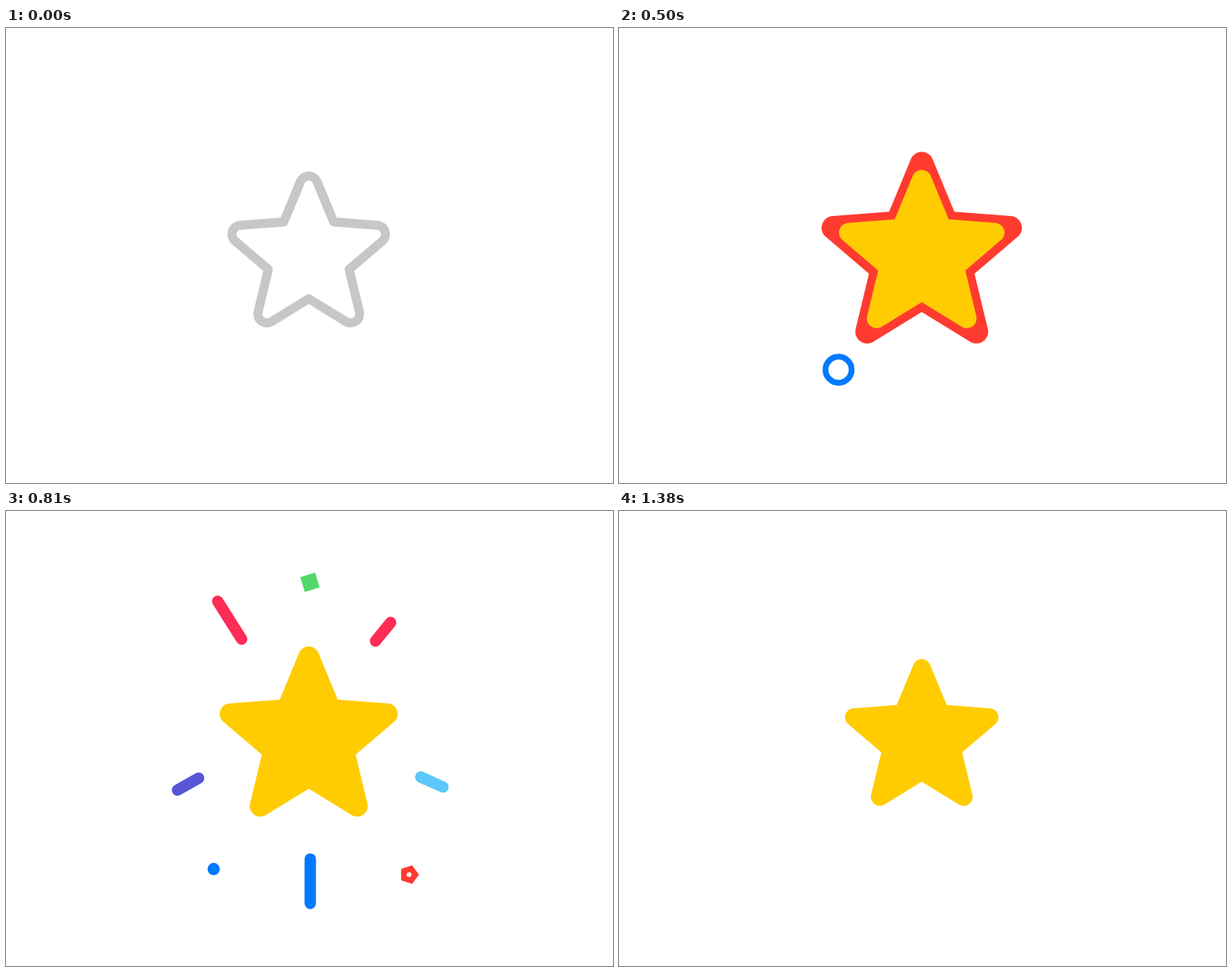
An HTML page with a canvas for the animation above (1410 ms loop, 800 by 600 pixels).

```html
<!DOCTYPE html>
<html lang="en">
<head>
<meta charset="utf-8">
<title>Star burst</title>
<style>
  html, body { margin: 0; width: 100%; height: 100%; overflow: hidden; background: #fff; }
  canvas { display: block; }
</style>
</head>
<body>
<canvas id="stage" width="800" height="600"></canvas>
<script>
const ctx = document.getElementById('stage').getContext('2d');
const LOOP = 1410;
const CX = 399, CY = 299.7;
const PEAK = 1.467, DIP = 0.931;

// Short pauses: the picture holds from the first time to the second.
const HOLDS = [[500, 570], [810, 880], [1030, 1100], [1220, LOOP]];

// Rays: colour, inner end, outer end.
const RAYS = [
  ['#ff2d55', 316, 177.6, 279, 119],
  ['#ff2d55', 483.5, 175.7, 507, 147],
  ['#5856d6', 258.7, 349.6, 226, 368],
  ['#5ac8fa', 541.7, 348.6, 576, 364],
  ['#007aff', 401, 448.8, 401, 517.5]
];

const progress = (t, a, b) => Math.min(1, Math.max(0, (t - a) / (b - a)));
const outCubic = x => 1 - (1 - x) ** 3;
const smooth = x => x * x * (3 - 2 * x);
const mix = (a, b, x) => a + (b - a) * x;
const rad = deg => deg * Math.PI / 180;

function starPath(scale) {
  const point = i => {
    const r = i % 2 ? 56 : 125;
    const a = rad(i * 36);
    return [CX + scale * r * Math.sin(a), CY + scale * (1.3 - r * Math.cos(a))];
  };
  ctx.beginPath();
  ctx.moveTo(...point(-1));
  for (let i = 0; i < 10; i += 2) {
    ctx.arcTo(...point(i), ...point(i + 1), 11.9 * scale);
    ctx.lineTo(...point(i + 1));
  }
  ctx.closePath();
}

function fillStar(scale, color) {
  if (scale <= 0) return;
  starPath(scale);
  ctx.fillStyle = color;
  ctx.fill();
}

function strokePath(color, width) {
  ctx.strokeStyle = color;
  ctx.lineWidth = width;
  ctx.stroke();
}

function drawOutline(t) {
  const width = 12 - 0.028 * t;
  if (width <= 0) return;
  starPath(1 - 0.00016 * t);
  ctx.lineJoin = 'round';
  strokePath('#c7c7c9', width);
}

function drawRays(t, left) {
  const reach = outCubic(progress(t, 500, 680));
  if (reach <= 1 - left || left <= 0) return;
  ctx.lineCap = 'round';
  for (const [color, x0, y0, x1, y1] of RAYS) {
    ctx.beginPath();
    ctx.moveTo(mix(x1, x0, left), mix(y1, y0, left));
    ctx.lineTo(mix(x0, x1, reach), mix(y0, y1, reach));
    strokePath(color, 15);
  }
}

function drawRing(t) {
  const r = 17.2 * (1 - smooth(progress(t, 685, 870)));
  if (t < 340 || r < 0.1) return;
  const d = outCubic(progress(t, 340, 660));
  ctx.beginPath();
  ctx.arc(CX - 125.3 * d, CY + 172.5 * d, r, 0, Math.PI * 2);
  strokePath('#007aff', 7.7);
}

function drawPentagon(t) {
  const r = 16 * (1 - smooth(progress(t, 691, 935)));
  if (t < 460 || r < 0.1) return;
  const d = outCubic(progress(t, 460, 740));
  const turn = 0.31 * (810 - t);
  ctx.beginPath();
  for (let i = 0; i < 5; i++) {
    const a = rad(turn + i * 72);
    ctx.lineTo(CX + 132.3 * d + r * Math.cos(a), CY + 179.8 * d + r * Math.sin(a));
  }
  ctx.closePath();
  ctx.lineJoin = 'miter';
  strokePath('#ff3b30', 7.5);
}

function drawSquare(t, left) {
  if (t < 470 || left <= 0) return;
  const side = 24 * left;
  const d = outCubic(progress(t, 470, 850));
  ctx.save();
  ctx.translate(CX + 1.6 * d, CY - 206 * d);
  ctx.rotate(rad(10 - 0.3 * (t - 720)));
  ctx.fillStyle = '#53d769';
  ctx.fillRect(-side / 2, -side / 2, side, side);
  ctx.restore();
}

function starScale(t) {
  if (t < 710) return PEAK * outCubic(progress(t, 383, 710));
  if (t < 1060) {
    const x = progress(t, 710, 1040);
    return mix(DIP, PEAK, (1 - x ** 1.6) ** 5.31);
  }
  return mix(DIP, 1, smooth(progress(t, 1060, 1220)));
}

function draw(time) {
  const hold = HOLDS.find(([a, b]) => time >= a && time < b);
  const t = hold ? hold[0] : time;
  const left = 1 - progress(t, 608, 991) ** 3;

  ctx.fillStyle = '#fff';
  ctx.fillRect(0, 0, 800, 600);

  drawRays(t, left);
  drawRing(t);
  drawPentagon(t);
  drawSquare(t, left);
  drawOutline(t);
  if (t < 705) fillStar(1.467 * outCubic(progress(t, 337, 650)), '#ff3b30');
  fillStar(starScale(t), '#ffcc02');
}

const start = performance.now();
function frame() {
  draw((performance.now() - start) % LOOP);
  requestAnimationFrame(frame);
}
frame();
</script>
</body>
</html>
```
